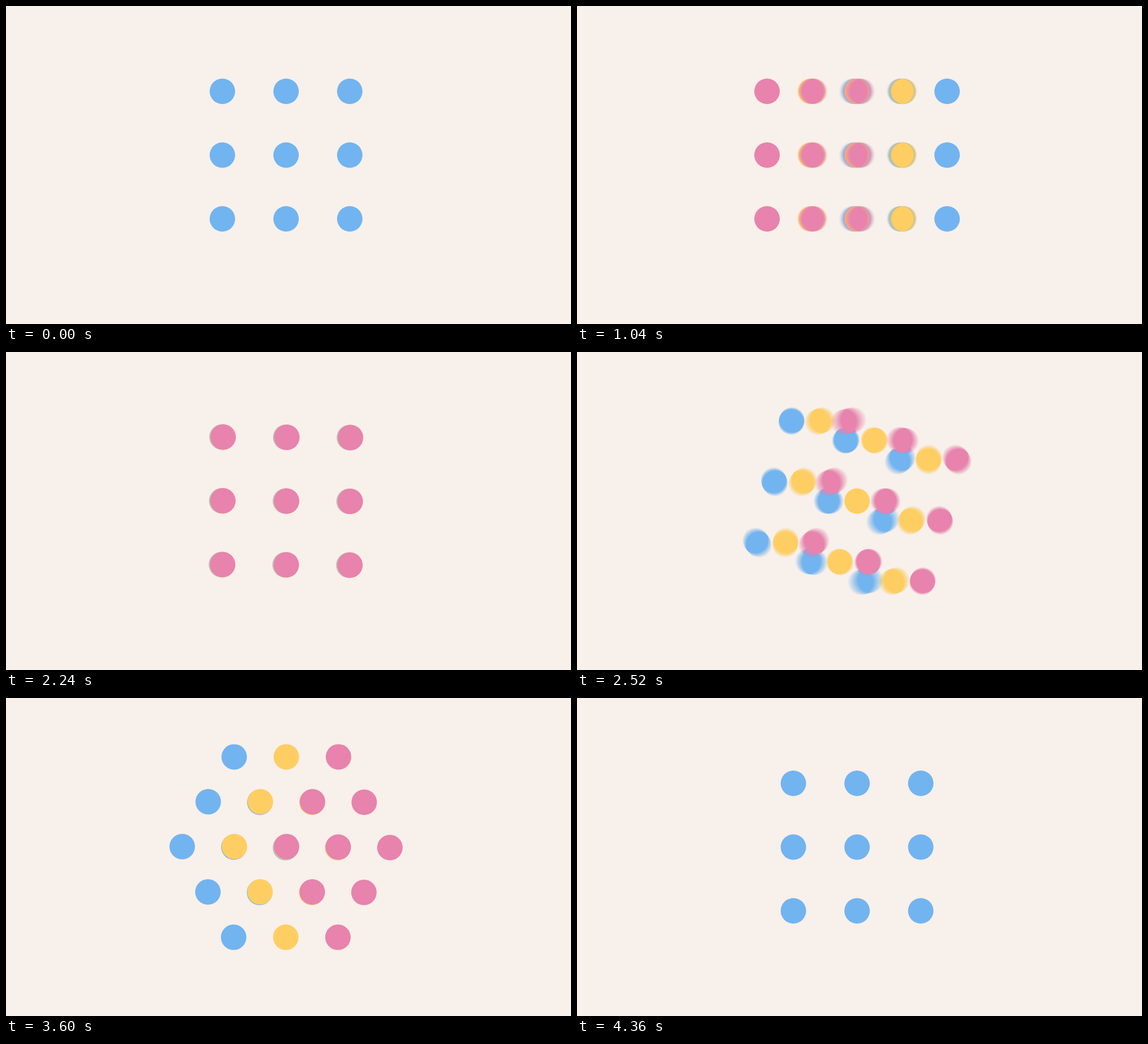
An HTML page with a canvas for the animation above (4.84 s loop, 998x561 px).

```html
<!DOCTYPE html>
<html lang="en">
<head>
<meta charset="utf-8">
<title>Turning cube of dots</title>
<style>
  html, body { margin: 0; width: 100%; height: 100%; overflow: hidden; background: #f8f0ea; }
  canvas { display: block; width: 998px; height: 561px; }
</style>
</head>
<body>
<canvas id="stage" width="998" height="561"></canvas>
<script>
const W = 998, H = 561, CX = 494.7, CY = 263;
const GAP = 112.5, RADIUS = 22.5;
const BACKGROUND = '#f8f0ea';
const COLORS = ['#e783ad', '#ffce63', '#72b4f0']; // back to front
const LOOP = 4840, STEP = 40, SHUTTER = 24, SAMPLES = 8;
const RAD = Math.PI / 180;
const CORNER = Math.atan(Math.SQRT2) / RAD; // turn that looks straight at a corner

// Each move: start ms, length ms, degrees, time warp
const YAW = [
  [150, 1410, 180, 1.12],
  [2156, 757, CORNER, 1],
  [3549, 800, 180 - CORNER, 1]
];
const ROLL = [
  [2162, 800, -45, 1],
  [3515, 806, -45, 1]
];

const ease = p => p < 0.5 ? 4 * p ** 3 : 1 - 4 * (1 - p) ** 3;

function angle(moves, t) {
  let sum = 0;
  for (const [start, length, degrees, warp] of moves) {
    const p = Math.min(1, Math.max(0, (t - start) / length));
    sum += degrees * ease(p ** warp);
  }
  return sum * RAD;
}

const cube = [];
for (let z = -1; z <= 1; z++)
  for (let y = -1; y <= 1; y++)
    for (let x = -1; x <= 1; x++) cube.push({ x, y, z });

const ctx = document.getElementById('stage').getContext('2d');
const layer = document.createElement('canvas');
layer.width = W;
layer.height = H;
const pen = layer.getContext('2d');

function drawCube(t) {
  const yaw = angle(YAW, t), roll = angle(ROLL, t);
  const cy = Math.cos(yaw), sy = Math.sin(yaw);
  const cr = Math.cos(roll), sr = Math.sin(roll);

  const dots = cube.map(({ x, y, z }) => {
    const u = x * cr - y * sr;
    return {
      x: u * cy + z * sy,
      y: x * sr + y * cr,
      depth: z * cy - u * sy,
      color: COLORS[z + 1]
    };
  }).sort((a, b) => a.depth - b.depth);

  pen.fillStyle = BACKGROUND;
  pen.fillRect(0, 0, W, H);
  // Dots exactly behind another one would only thicken its edge
  dots.forEach((d, i) => {
    const hidden = dots.some((e, k) => k > i && Math.hypot(e.x - d.x, e.y - d.y) < 1e-4);
    if (hidden) return;
    pen.fillStyle = d.color;
    pen.beginPath();
    pen.arc(CX + d.x * GAP, CY + d.y * GAP, RADIUS, 0, 2 * Math.PI);
    pen.fill();
  });
}

// Motion blur: running average over the open shutter
function render(t) {
  for (let i = 0; i < SAMPLES; i++) {
    drawCube(t + SHUTTER * i / SAMPLES);
    ctx.globalAlpha = 1 / (i + 1);
    ctx.drawImage(layer, 0, 0);
  }
}

const begin = performance.now();
let shown = -1;

function tick() {
  const t = Math.floor((performance.now() - begin) % LOOP / STEP) * STEP;
  if (t !== shown) render(shown = t);
  requestAnimationFrame(tick);
}
tick();
</script>
</body>
</html>
```
